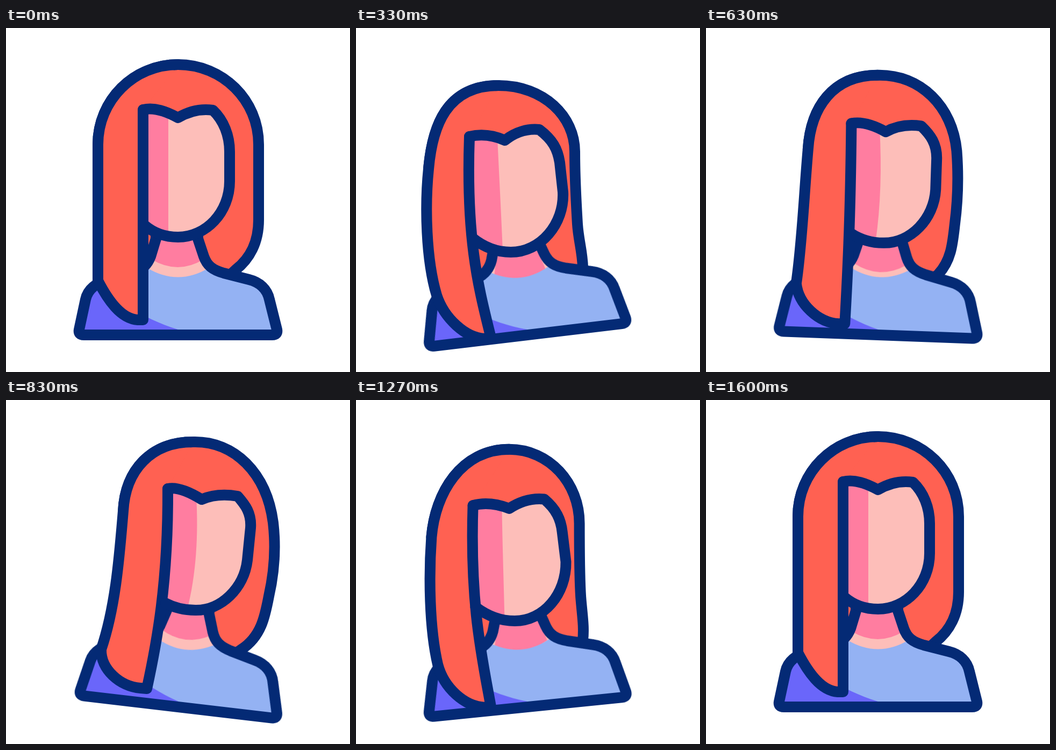
Recreate the animation shown at these times as an HTML page without scripts. Size 640 by 640 pixels, loop 2000 ms.

```html
<!DOCTYPE html>
<html lang="en">
<head>
<meta charset="utf-8">
<title>Swaying portrait</title>
<style>
  html, body { margin: 0; width: 100%; height: 100%; overflow: hidden; background: #fff; }
  svg { display: block; width: 100vw; height: 100vh; }

  .line { stroke: #042a75; stroke-width: 20; stroke-linejoin: round; stroke-linecap: round; }
  .hair { fill: #ff6152; }
  .skin { fill: #fdbeb9; }
  .pink { fill: #ff7da0; }
  .shirt { fill: #94b2f3; }
  .shade { fill: #6a66fa; }
  .bare { fill: none; }

  .move { animation: 2s ease-in-out infinite; }
  #body { animation-name: sway; transform-origin: 320px 571px; }
  #chin-shadow { animation-name: drop; }
  #back-hair { animation-name: back-hair; }
  #lock { animation-name: lock; }
  .face { animation-name: face; }
  #cheek { animation-name: cheek; }

  /* Poses: rest, left, right, left again, rest */
  @keyframes sway {
    0%, 80%, 100% { transform: rotate(0deg); }
    16.67% { transform: rotate(-6.8deg); }
    41.67% { transform: rotate(6.7deg); }
    57.5% { transform: rotate(-6.8deg); }
  }
  @keyframes drop {
    0%, 80%, 100% { transform: translateY(0); }
    16.67% { transform: translateY(27px); }
    41.67% { transform: translateY(0); }
    57.5% { transform: translateY(25px); }
  }
  @keyframes back-hair {
    0%, 80%, 100% { d: path("M171 217 C171 134 238 68 320 68 C403 68 470 134 470 217 C470 264 470 310 470 357 C470 399 453 430 427 450 L400 475 L250 475"); }
    16.67% { d: path("M135 262 C142 183 168 107 265 107 C350 107 407 165 407 230 C407 285 410 330 412 365 C414 395 421 415 422 445 L400 475 L245 475"); }
    41.67% { d: path("M218 207 C222 130 270 78 348 78 C425 76 485 136 497 228 C503 280 497 330 489 365 C482 402 475 440 438 464 L415 480 L265 475"); }
    57.5% { d: path("M135 262 C143 180 188 96 279 96 C352 96 406 158 406 232 C406 285 406 330 409 368 C412 400 420 420 421 448 L400 475 L245 475"); }
  }
  @keyframes lock {
    0%, 80%, 100% { d: path("M320 68 C238 68 171 134 171 217 C171 300 171 390 171 470 C189 505 213 541 245 543 L255 543 C255 420 255 280 255 152"); }
    16.67% { d: path("M265 107 C168 107 142 183 135 262 C128 330 130 430 150 497 C164 540 204 577 240 578 L251 576 C230 490 204 400 211 202"); }
    41.67% { d: path("M348 78 C270 78 222 130 218 207 C211 290 204 385 177 464 C176 501 212 533 250 536 L262 537 C280 455 302 340 301 165"); }
    57.5% { d: path("M279 96 C188 96 143 180 135 262 C129 330 130 430 149 497 C159 540 199 576 240 577 L250 574 C231 490 204 400 211 204"); }
  }
  @keyframes face {
    0%, 80%, 100% { d: path("M255 152 C276 147 298 155 320 167 C342 154 364 150 385 153 C405 172 416 200 416 230 L416 285 C416 343 372 389 320 389 C293 389 272 379 258 367"); }
    16.67% { d: path("M211 202 C232 197 254 199 277 209 C297 193 320 187 341 189 C366 208 375 225 379 250 L385 305 C388 365 343 417 288 417 C262 417 238 408 216 390"); }
    41.67% { d: path("M301 165 C320 161 343 172 364 185 C385 176 408 175 431 179 C445 195 457 210 455 238 L449 298 C443 350 400 392 352 391 C332 391 314 387 297 378"); }
    57.5% { d: path("M211 204 C232 198 256 200 279 208 C300 194 322 188 344 190 C367 209 375 226 378 248 L386 304 C387 364 345 415 291 415 C264 415 240 406 216 388"); }
  }
  @keyframes cheek {
    0%, 80%, 100% { d: path("M255 152 L302 158 C302 230 302 310 302 387 L258 367 Z"); }
    16.67% { d: path("M211 202 L263 203 C266 270 270 340 273 416 L216 390 Z"); }
    41.67% { d: path("M301 165 L354 180 C358 250 354 325 337 390 L297 378 Z"); }
    57.5% { d: path("M211 204 L266 204 C267 270 270 340 272 414 L216 388 Z"); }
  }
</style>
</head>
<body>
<svg viewBox="0 0 640 640">
  <defs>
    <path id="torso" d="M279 370 V392 L269 425 C263 441 253 450 238 455 L190 468 C168 474 152 486 148 505 L136 561 Q134 571 145 571 H495 Q506 571 504 561 L490 505 C486 486 472 473 452 468 L405 456 C384 450 374 442 368 425 L357 392 V370 Z"/>
  </defs>

  <path id="back-hair" class="move hair line"/>

  <g id="body" class="move">
    <use href="#torso" class="skin"/>
    <path id="chin-shadow" class="move pink" d="M279 350 H357 V392 L368 430 Q320 460 270 430 L279 392 Z"/>
    <path class="shirt" d="M262 446 Q320 481 378 446 L452 468 C472 473 486 486 490 505 L504 571 H137 L148 505 C152 486 168 474 190 468 Z"/>
    <path class="shade" d="M145 571 L137 561 L148 505 L175 470 C200 500 250 540 320 561 Z"/>
    <use href="#torso" class="bare line"/>
  </g>

  <path class="move face skin"/>
  <path id="cheek" class="move pink"/>
  <path id="lock" class="move hair line"/>
  <path class="move face bare line"/>
</svg>
</body>
</html>
```
